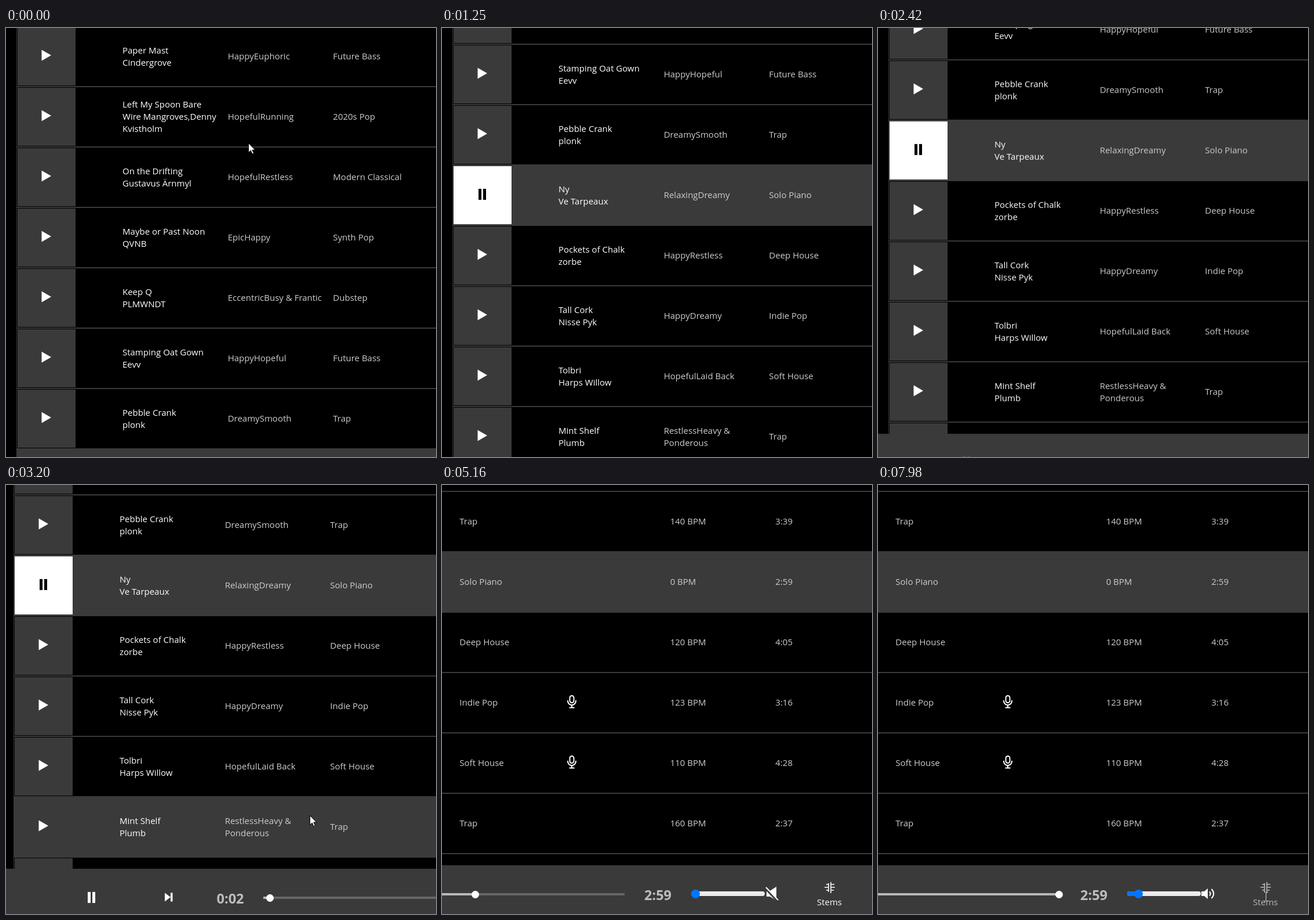
Animation, 742 px wide and 739 px high, one loop 8000 ms. Source, as an HTML page:

```html
<!DOCTYPE html>
<html lang="en">
<head>
<meta charset="utf-8">
<title>Track list</title>
<style>
  :root { --gray: #3a3a3a; --soft: #bebebe; --label: #cdcdcd; }
  html, body { margin: 0; width: 100%; height: 100%; overflow: hidden; background: #000; }
  body { position: relative; font: 15px/21px "Open Sans", "Noto Sans", sans-serif; color: #fff; }
  body * { position: absolute; box-sizing: border-box; }
  br { position: static; }
  svg { overflow: visible; }
  #stage { inset: 0; overflow: hidden; }

  /* 1% of the loop is 80 ms */
  #world, #list, #cursor, #beam, .hover, .live .cell, .live svg, .fill, .mute, .loud, #stems {
    animation: 8s linear infinite;
  }

  #world { left: 0; top: 0; width: 1320px; height: 900px; animation-name: pan; }
  @keyframes pan {
    0%, 25.75% { transform: translate(0, 0); }
    30.25% { transform: translate(0, -77px); }
    33.25%, 59.25% { transform: translate(-5px, -115px); }
    64.5%, 100% { transform: translate(-534px, -121px); }
  }

  #list { left: 18px; top: -493px; width: 1302px; height: 1400px; border-left: 1px solid var(--gray);
    animation-name: scroll; animation-timing-function: step-end; }
  @keyframes scroll { 0% { transform: translateY(489px); } .75%, 100% { transform: none; } }

  .row { left: 0; width: 100%; height: 104px; border-top: 2px solid var(--gray); }
  .live { background: var(--gray); }
  .hover { inset: 0; background: var(--gray); opacity: 0; }
  .cell { left: 1px; top: 1px; width: 100px; height: 100px; background: var(--gray); }
  .col { top: 0; height: 101px; display: flex; align-items: center; white-space: nowrap; color: var(--label); }
  .col span { position: static; }
  .name { color: #fff; }

  .live .cell { animation-name: lit; }
  @keyframes lit { 0%, 7.5% { background: var(--gray); } 10.5%, 100% { background: #fff; } }
  .live .play { animation-name: playOff; animation-timing-function: step-end; }
  .live .pause { animation-name: pauseOn; animation-timing-function: step-end; }
  @keyframes playOff { 0% { opacity: 1; } 7.5%, 100% { opacity: 0; } }
  @keyframes pauseOn { 0% { opacity: 0; } 7.5%, 100% { opacity: 1; } }

  .h4 { animation-name: h4; }
  .h5 { animation-name: h5; }
  .h8 { animation-name: h8; }
  .h11 { animation-name: h11; }
  @keyframes h4 { 0%, 17.875% { opacity: 0; } 20.125%, 22.5% { opacity: 1; } 23.875%, 100% { opacity: 0; } }
  @keyframes h5 { 0%, 50.25% { opacity: 0; } 52.5%, 54.75% { opacity: 1; } 57%, 100% { opacity: 0; } }
  @keyframes h8 { 0%, 7.5% { opacity: 0; } 10.5%, 13.5% { opacity: 1; } 15.6%, 100% { opacity: 0; } }
  @keyframes h11 {
    0%, 35.5% { opacity: 0; } 37.75%, 40.75% { opacity: 1; } 43%, 66.875% { opacity: 0; }
    69.125%, 72.75% { opacity: 1; } 75%, 100% { opacity: 0; }
  }

  #bar { left: 0; top: 776px; width: 1320px; height: 124px; background: var(--gray); }
  .time { width: 80px; top: 35px; text-align: center; font-size: 23.5px; line-height: 32px; font-weight: 700; color: var(--soft); }
  .track { left: 449px; top: 48px; width: 400px; height: 4px; background: #666; }
  .fill { left: 0; top: 0; height: 100%; background: #b9b9b9; animation-name: seek; }
  .fill::after { content: ""; position: absolute; right: -6.5px; top: -4.5px; width: 13px; height: 13px; border-radius: 50%; background: #fff; }
  @keyframes seek {
    0%, 43% { width: 11px; }
    49.5%, 57% { width: 140px; }
    69%, 77.25% { width: 143.5px; }
    83.75%, 87.5% { width: 396px; }
    87.625%, 100% { width: 397px; }
  }
  .vol { left: 964px; top: 45px; width: 127px; height: 8px; border-radius: 4px; background: #ebebeb; }
  .vol .fill { background: #0075ff; border-radius: 4px; animation-name: level; }
  .vol .fill::after { right: -7.5px; top: -3.5px; width: 15px; height: 15px; background: #0075ff; }
  @keyframes level {
    0%, 84.5% { width: 7px; }
    86.875%, 90.75% { width: 31px; }
    93%, 100% { width: 19px; }
  }
  .mute { animation-name: muteOff; animation-timing-function: step-end; }
  .loud { animation-name: loudOn; animation-timing-function: step-end; }
  @keyframes muteOff { 0% { opacity: 1; } 84.5%, 100% { opacity: 0; } }
  @keyframes loudOn { 0% { opacity: 0; } 84.5%, 100% { opacity: 1; } }
  #stems { left: 1172px; top: 27px; width: 61px; height: 50px; animation-name: dim; }
  #stems span { left: 0; width: 100%; top: 26px; text-align: center; }
  @keyframes dim { 0%, 94.5% { opacity: 1; } 96.75%, 100% { opacity: .64; } }

  #cursor, #beam { left: 0; top: 0; animation-timing-function: step-end; }
  #cursor { animation-name: point; }
  @keyframes point {
    0% { transform: translate(418px, 198px); opacity: 1; }
    .75% { transform: translate(80px, 300px); opacity: 1; }
    7.5% { transform: translate(200px, 392px); opacity: 1; }
    13.5% { transform: translate(480px, 657px); opacity: 1; }
    15% { transform: translate(480px, 657px); opacity: 0; }
    17.875% { transform: translate(480px, 14px); opacity: 1; }
    22.5% { transform: translate(480px, 14px); opacity: 0; }
    35.5% { transform: translate(524px, 569px); opacity: 1; }
    40.75% { transform: translate(455px, 710px); opacity: 1; }
    43% { transform: translate(455px, 710px); opacity: 1; animation-timing-function: linear; }
    49.5% { transform: translate(584px, 710px); opacity: 1; }
    50.25% { transform: translate(600px, 9px); opacity: 1; }
    54.75% { transform: translate(600px, 9px); opacity: 0; }
    66.875% { transform: translate(248px, 531px); opacity: 1; }
    72.75% { transform: translate(58px, 712px); opacity: 1; }
    77.25% { transform: translate(58px, 712px); opacity: 1; animation-timing-function: linear; }
    83.75% { transform: translate(311px, 712px); opacity: 1; }
    84.5% { transform: translate(437px, 705px); opacity: 1; animation-timing-function: linear; }
    86.875% { transform: translate(461px, 705px); opacity: 1; }
    90.75% { transform: translate(461px, 705px); opacity: 1; animation-timing-function: linear; }
    93% { transform: translate(449px, 705px); opacity: 1; }
    94.5%, 100% { transform: translate(669px, 702px); opacity: 0; }
  }
  #beam { animation-name: beam; }
  @keyframes beam { 0% { opacity: 0; } 94.5%, 100% { opacity: 1; } }
</style>
</head>
<body>
<div id="stage">
  <div id="world">
    <div id="list"></div>
    <div id="bar">
      <svg width="400" height="100" fill="#fff">
        <path d="M146 40h5v19h-5zM154 40h5v19h-5zM279 41.500l10 7.500-10 7.500zM289 41.500h3.500v15h-3.500z"/>
      </svg>
      <div class="time" id="clock" style="left:352px">0:01</div>
      <div class="track"><div class="fill"></div></div>
      <div class="time" style="left:866.5px">2:59</div>
      <div class="track vol"><div class="fill"></div></div>
      <svg class="mute" style="left:1092px;top:37px" width="24" height="24" fill="#fff">
        <path d="M2 7h6L19 0v24L8 17H2z"/>
        <path d="M0 2.500L21 24.500" stroke="#3a3a3a" stroke-width="4"/>
        <path d="M1 1L22 23" stroke="#fff" stroke-width="2"/>
      </svg>
      <svg class="loud" style="left:1092px;top:37px" width="24" height="24" fill="#fff">
        <path d="M0 8h5l6-5v18l-6-5H0z"/>
        <path d="M14 8.500q3.500 3.500 0 7M17.500 4q7.500 8 0 16" fill="none" stroke="#fff" stroke-width="2"/>
      </svg>
      <div id="stems">
        <svg style="left:22px;top:2px" width="18" height="20" fill="none" stroke="#fff" stroke-width="1.600">
          <path d="M7 2v15M11 0v19M3 4h4M11 4h6M0 9h7M11 9h7M3 14h4M11 14h5"/>
        </svg>
        <span>Stems</span>
      </div>
    </div>
  </div>
  <svg id="cursor" width="13" height="21">
    <path d="M.5.5v16l3.800-3.500 2.600 6 2.600-1.100-2.600-5.900h5z" fill="#fff" stroke="#000"/>
  </svg>
  <svg id="beam" width="742" height="739" fill="none" stroke="#ddd">
    <path d="M666.500 701.500h2l1 1 1-1h2M669.500 702v14M666.500 716.500h2l1-1 1 1h2"/>
  </svg>
</div>
<script>
  // title, artist, mood, genre, bpm, length, vocals
  const tracks = [
    ["Paper Mast", "Cindergrove", "HappyEuphoric", "Future Bass"],
    ["Left My Spoon Bare", "Wire Mangroves,Denny<br>Kvistholm", "HopefulRunning", "2020s Pop"],
    ["On the Drifting", "Gustavus Ärnmyl", "HopefulRestless", "Modern Classical"],
    ["Maybe or Past Noon", "QVNB", "EpicHappy", "Synth Pop"],
    ["Keep Q", "PLMWNDT", "EccentricBusy &amp; Frantic", "Dubstep"],
    ["Stamping Oat Gown", "Eevv", "HappyHopeful", "Future Bass"],
    ["Pebble Crank", "plonk", "DreamySmooth", "Trap", 140, "3:39"],
    ["Ny", "Ve Tarpeaux", "RelaxingDreamy", "Solo Piano", 0, "2:59"],
    ["Pockets of Chalk", "zorbe", "HappyRestless", "Deep House", 120, "4:05"],
    ["Tall Cork", "Nisse Pyk", "HappyDreamy", "Indie Pop", 123, "3:16", true],
    ["Tolbri", "Harps Willow", "HopefulLaid Back", "Soft House", 110, "4:28", true],
    ["Mint Shelf", "Plumb", "RestlessHeavy &amp;<br>Ponderous", "Trap", 160, "2:37"],
    []
  ];
  const LIVE = 7;

  const icon = (name, path, fill) =>
    `<svg class="${name}" width="100" height="100" fill="${fill}"><path d="${path}"/></svg>`;
  const play = icon("play", "M41.500 38.500L58 48l-16.500 9.500z", "#fff");
  const pause = icon("pause", "M43 39h5v19h-5zM51 39h5v19h-5z", "#000");
  const mic = `<svg style="left:731px;top:38px" width="16" height="24" fill="none" stroke="#fff" stroke-width="2">
    <rect x="4.500" y="1" width="7" height="12" rx="3.500"/><path d="M1 9v1a7 7 0 0 0 14 0V9M8 17v4M3.500 21.500h9"/></svg>`;

  const col = (n, text, cls = "") =>
    text === undefined ? "" : `<div class="col ${cls}" style="left:${182 + n * 181.66}px"><span>${text}</span></div>`;

  const row = ([title, artist, mood, genre, bpm, length, vocals], i) =>
    `<div class="row ${i === LIVE ? "live" : ""}" style="top:${i * 104}px">
      <div class="hover h${i}"></div>
      <div class="cell">${play}${i === LIVE ? pause : ""}</div>
      ${col(0, title && `${title}<br>${artist}`, "name")}${col(1, mood)}${col(2, genre)}
      ${vocals ? mic : ""}
      ${col(4, bpm === undefined ? bpm : bpm + " BPM")}${col(5, length)}
    </div>`;

  document.getElementById("list").innerHTML = tracks.map(row).join("");

  const clock = document.getElementById("clock");
  const start = performance.now();

  function seconds(t) {
    if (t < 2840) return 1;
    const drag = Math.min(1, Math.max(0, (t - 3440) / 520));
    return Math.floor(2 + 58 * drag);
  }

  function tick() {
    const s = seconds((performance.now() - start) % 8000);
    clock.textContent = Math.floor(s / 60) + ":" + String(s % 60).padStart(2, "0");
    requestAnimationFrame(tick);
  }
  tick();
</script>
</body>
</html>
```
